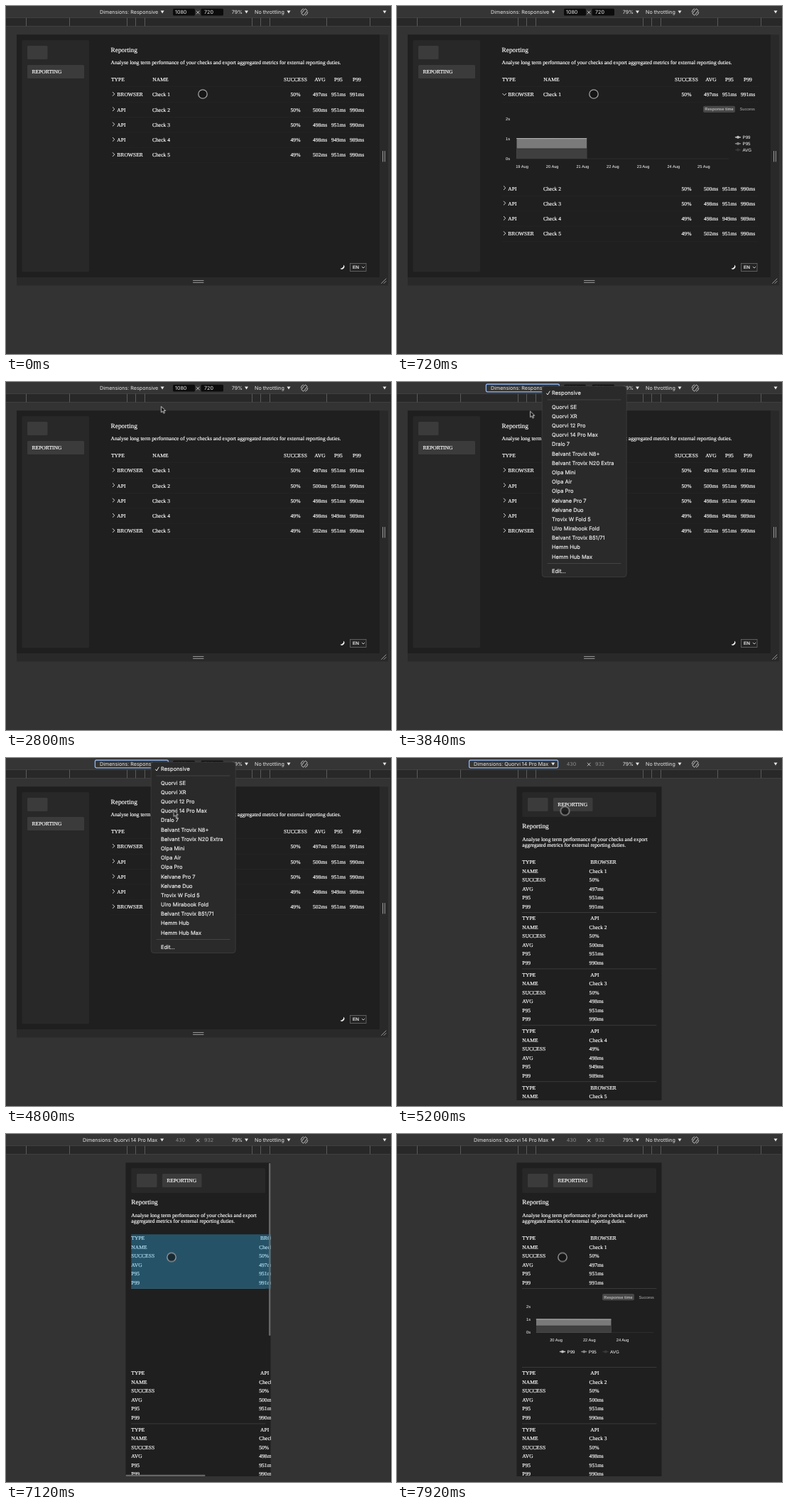
An HTML page that plays this animation: 542x490 px, repeating every 8 s.

```html
<!DOCTYPE html>
<html lang="en">
<head>
<meta charset="utf-8">
<title>Responsive reporting table</title>
<style>
html, body { margin: 0; width: 542px; height: 490px; overflow: hidden; background: #333; }
svg { display: block; }
text { white-space: pre; text-rendering: geometricPrecision; stroke-width: .16px; }
.page { font: 7.57px "Liberation Serif", serif; fill: #fff; }
.page text { stroke: #fff; }
.page .chart text { stroke: none; }
.chart { font: 5.68px "Liberation Sans", sans-serif; fill: #fff; }
.bar { font: 7.15px Inter, sans-serif; fill: #e8e8e8; }
.menu { font: 7.5px Inter, sans-serif; fill: #f2f2f2; }
.menu text { stroke: #f2f2f2; }
.mid { text-anchor: middle; }
.end { text-anchor: end; }
.line { fill: none; stroke-linecap: round; stroke-linejoin: round; }

/* 1% of the loop is 80 ms */
.move, .flip { animation: 8s linear -16ms infinite; }
.flip { animation-timing-function: step-end; }

.desktop { animation-name: desktop; }
.mobile { animation-name: mobile; }
.open { animation-name: open; }
.shut { animation-name: shut; }
.rest { animation-name: rest; }
.tapD { animation-name: tapD; }
.tapM { animation-name: tapM; }
.focusD { animation-name: focusD; }
.focusM { animation-name: focusM; }
.drop { animation-name: drop; }
.hover { animation-name: hover; }
.openM { animation-name: openM; }
.restM { animation-name: restM; }
.vals { animation-name: vals; }
.bars { animation-name: bars; }
.drawD { animation-name: drawD; }
.drawM { animation-name: drawM; }
.ptr { animation-name: ptr; }
.touch { animation-name: touch; }
.arrow { animation-name: arrow; }

@keyframes desktop { 0% { opacity: 1 } 63%, 100% { opacity: 0 } }
@keyframes mobile { 0% { opacity: 0 } 63%, 100% { opacity: 1 } }
@keyframes open { 0% { opacity: 0 } 6% { opacity: 1 } 28%, 100% { opacity: 0 } }
@keyframes shut { 0% { opacity: 1 } 6% { opacity: 0 } 28%, 100% { opacity: 1 } }
@keyframes rest { 0% { transform: none } 6% { transform: translateY(111px) } 28%, 100% { transform: none } }
@keyframes tapD { 0% { opacity: 0 } 5% { opacity: 1 } 7% { opacity: 0 } 27% { opacity: 1 } 29%, 100% { opacity: 0 } }
@keyframes tapM { 0% { opacity: 0 } 88% { opacity: 1 } 90%, 100% { opacity: 0 } }
@keyframes focusD { 0% { opacity: 0 } 43% { opacity: 1 } 63%, 100% { opacity: 0 } }
@keyframes focusM { 0% { opacity: 0 } 63% { opacity: 1 } 88%, 100% { opacity: 0 } }
@keyframes drop { 0%, 42.99% { opacity: 0 } 43%, 60.4% { opacity: 1 } 62%, 100% { opacity: 0 } }
@keyframes hover {
  0% { opacity: 0; transform: translateY(-13.2px) }
  50% { opacity: 1; transform: translateY(-13.2px) }
  51.6% { opacity: 1; transform: none }
  54% { opacity: 0 } 55% { opacity: 1 } 60%, 100% { opacity: 0 }
}
@keyframes openM { 0% { opacity: 0 } 91%, 100% { opacity: 1 } }
@keyframes restM { 0% { transform: none } 89%, 100% { transform: translateY(111px) } }
@keyframes vals { 0% { transform: none } 89% { transform: translateX(85.7px) } 91%, 100% { transform: none } }
@keyframes bars { 0%, 88.99% { opacity: 0 } 89%, 93% { opacity: 1 } 97%, 100% { opacity: 0 } }
@keyframes drawD {
  0%, 5.6% { clip-path: inset(-2px 100% -2px 0) }
  16.4%, 100% { clip-path: inset(-2px 0 -2px 0) }
}
@keyframes drawM {
  0%, 91.3% { clip-path: inset(-2px 100% -2px 0) }
  100% { clip-path: inset(-2px 28.5% -2px 0) }
}
@keyframes ptr {
  0%, 30% { transform: translate(277px, 124px) }
  35% { transform: translate(223.5px, 36.5px) }
  39%, 43% { transform: translate(135px, 6px) }
  53%, 75% { transform: translate(236.5px, 74.5px) }
  78% { transform: translate(238.5px, 118px) }
  82%, 100% { transform: translate(233px, 173.5px) }
}
@keyframes touch { 0% { opacity: 1 } 34.6% { opacity: 0 } 62%, 100% { opacity: 1 } }
@keyframes arrow { 0% { opacity: 0 } 34.6% { opacity: 1 } 62%, 100% { opacity: 0 } }
</style>
</head>
<body>
<svg id="stage" width="542" height="490" viewBox="0 0 542 490"></svg>
<script>
const rows = [
  ['BROWSER', '50%', '497ms', '951ms', '991ms'],
  ['API', '50%', '500ms', '951ms', '990ms'],
  ['API', '50%', '498ms', '951ms', '990ms'],
  ['API', '49%', '498ms', '949ms', '989ms'],
  ['BROWSER', '49%', '502ms', '951ms', '990ms']
];
const heads = ['TYPE', 'NAME', 'SUCCESS', 'AVG', 'P95', 'P99'];
const phone = 'Quorvi 14 Pro Max';
const devices = [
  'Quorvi SE', 'Quorvi XR', 'Quorvi 12 Pro', phone, 'Dralo 7',
  'Belvant Trovix N8+', 'Belvant Trovix N20 Extra', 'Olpa Mini', 'Olpa Air', 'Olpa Pro',
  'Kelvane Pro 7', 'Kelvane Duo', 'Trovix W Fold 5', 'Ulro Mirabook Fold',
  'Belvant Trovix B51/71', 'Hemm Hub', 'Hemm Hub Max'
];

const text = (x, y, s, attrs = '') => `<text x="${x}" y="${y}" ${attrs}>${s}</text>`;
const mid = (x, y, s, attrs = '') => text(x, y, s, `class="mid" ${attrs}`);
const rect = (x, y, w, h, fill, attrs = '') =>
  `<rect x="${x}" y="${y}" width="${w}" height="${h}" fill="${fill}" ${attrs}/>`;
const line = (d, color, w = 1, attrs = '') =>
  `<path class="line" d="${d}" stroke="${color}" stroke-width="${w}" ${attrs}/>`;
const group = (cls, ...parts) => `<g class="${cls}">${parts.join('')}</g>`;
const caret = x => `<path d="M${x} 6.6h5l-2.5 4z"/>`;
const ring = (x, w) => rect(x, 3, w, 10.8, 'none', 'rx="2" stroke="#8fb6f2" stroke-width="1.3"');

function toolbar() {
  const ticks = [28, 89, 170, 182, 195, 346, 358, 371, 451, 512];
  return rect(0, 0, 542, 16.5, '#353535') + rect(0, 16.5, 542, 12, '#282828') +
    line('M0 16.5H542M0 28.5H542', '#484848', .7) +
    line(ticks.map(x => `M${x + .5} 17V28`).join(''), '#5a5a5a') +
    rect(541, 17, 1, 473, '#252525') +
    group('bar',
      group('flip desktop',
        text(132, 11.2, 'Dimensions: Responsive') + caret(217.6),
        rect(235, 3.8, 31, 9.6, '#0c0c0c', 'rx="1.5"') + rect(274.5, 3.8, 31.5, 9.6, '#0c0c0c', 'rx="1.5"'),
        text(238, 11.2, '1080') + text(279, 11.2, '720')),
      group('flip mobile',
        text(108, 11.2, 'Dimensions: ' + phone) + caret(217.2),
        text(238.7, 11.2, '430', 'fill="#8b8b8b"') + text(279, 11.2, '932', 'fill="#8b8b8b"')),
      group('flip focusD', ring(125.4, 103)),
      group('flip focusM', ring(101.6, 125)),
      line('M268.2 7l4 4m0-4l-4 4', '#ddd', .8),
      text(317.7, 11.2, '79%') + caret(336),
      text(350, 11.2, 'No throttling') + caret(395.5) + caret(530.5),
      '<g transform="translate(420 8.5) rotate(38)">' +
        rect(-2, -4.4, 4, 8.8, 'none', 'rx=".8" stroke="#ddd" stroke-width=".8"') + '</g>',
      line('M415.2 8.5A4.8 4.8 0 0 1 418.6 3.9M424.8 8.5A4.8 4.8 0 0 1 421.4 13.1', '#ddd', .8));
}

// Response time chart; zero is the y of 0s, unit the height of one second
function chart(c) {
  const y = v => c.zero - v * c.unit;
  const w = c.x1 - c.x0, kink = c.x0 + w * .9;
  const top = `${c.x0} ${y(1.01)}L${kink} ${y(1)}L${c.x1} ${y(.96)}`;
  const avg = `${c.x0} ${y(.5)}H${c.x1}`;
  return rect(c.pill, c.pillY, 45, 9.2, '#474747', 'rx="2"') +
    mid(c.pill + 22.5, c.pillY + 6.6, 'Response time', 'font-weight="bold" fill="#b4b4b4"') +
    text(c.pill + 51.5, c.pillY + 6.6, 'Success', 'fill="#b0b0b0"') +
    [0, 1, 2].map(s => text(c.yLabel, y(s) + 2, s + 's', 'class="end"')).join('') +
    line(`M${c.x0} ${c.zero}H${c.x1 + 3}`, '#3a3a3a', .6) +
    group('move ' + c.draw,
      `<path d="M${top}V${c.zero}H${c.x0}z" fill="#7a7a7a"/>`,
      `<path d="M${avg}V${c.zero}H${c.x0}z" fill="#3f3f3f"/>`,
      line('M' + avg, '#2c2c2c', .8), line('M' + top, '#c4c4c4', .9)) +
    c.days.map((d, i) => mid(c.dayX + i * c.dayStep, c.dayY, d + ' Aug')).join('') +
    ['P99', 'P95', 'AVG'].map((s, i) => {
      const [x, ly] = c.legend(i), color = ['#c0c0c0', '#858585', '#3a3a3a'][i];
      return line(`M${x} ${ly}h7`, color, 1.4) +
        `<circle cx="${x + 3.5}" cy="${ly}" r="2" fill="${color}"/>` +
        text(x + 10, ly + 2.1, s, 'font-size="6.2"');
    }).join('');
}

const cols = [407.5, 442, 468, 494];

function desktopRow(r, i) {
  const y = 127.2 + i * 21.3;
  const closed = line(`M150.3 ${y - 5.8}l2.5 2.5l-2.5 2.5`, '#eee', .9);
  const opened = line(`M148.8 ${y - 3.8}l2.4 2.4l2.4-2.4`, '#eee', .9);
  return (i ? closed : group('flip shut', closed) + group('flip open', opened)) +
    text(156.3, y, r[0]) + text(206, y, 'Check ' + (i + 1)) +
    r.slice(1).map((v, k) => mid(cols[k], y, v)).join('') +
    line(`M147.5 ${y + 8}H508`, '#272727', .7);
}

function desktop() {
  const c = chart({
    x0: 168.5, x1: 464, zero: 215, unit: 28.2, yLabel: 159, pill: 431, pillY: 140.8,
    days: [19, 20, 21, 22, 23, 24, 25], dayX: 176, dayStep: 42.65, dayY: 227.6,
    legend: i => [476.5, 184.8 + i * 8.9], draw: 'drawD'
  });
  return rect(15, 40.4, 523, 353, '#292929') + rect(15, 40.4, 511, 341.6, '#1f1f1f') +
    line('M530.5 204.5V219M533.3 204.5V219M263.5 386.6H278M263.5 389.4H278', '#9a9a9a', 1) +
    line('M528.5 390.5l6.5-6.5M532 390.5l3-3', '#9a9a9a', 1) +
    rect(22.5, 48.3, 94.5, 326, '#282828', 'rx="1.5"') +
    rect(30, 56, 28.5, 19, '#3b3b3b', 'rx="1.5"') +
    rect(30, 83, 80, 19, '#3b3b3b', 'rx="1.5"') +
    text(36.5, 95.2, 'REPORTING') +
    text(147.5, 65, 'Reporting', 'font-size="9.4"') +
    text(147.5, 82, 'Analyse long term performance of your checks and export aggregated metrics for external reporting duties.') +
    text(148, 106.4, heads[0]) + text(206.3, 106.4, heads[1]) +
    heads.slice(2).map((h, k) => mid(cols[k], 106.4, h)).join('') +
    line('M147.5 113.6H508', '#272727', .7) +
    desktopRow(rows[0], 0) +
    group('flip open', group('chart', c)) +
    group('flip rest', rows.slice(1).map((r, i) => desktopRow(r, i + 1)).join('')) +
    group('flip tapD', rect(147, 113, 361, 22, 'rgba(51,181,229,.38)')) +
    '<path d="M475.2 364.4a3.6 3.6 0 1 1-5 5.2a4.6 4.6 0 0 0 5-5.2z"/>' +
    rect(484.5, 362.5, 22.5, 11, '#242424', 'stroke="#6c6c6c" stroke-width=".8"') +
    text(488, 370.4, 'EN', 'font-family="Liberation Sans, sans-serif" font-size="6.5"') +
    line('M501.2 367.2l1.8 1.8l1.8-1.8', '#eee', .8);
}

function mobileRow(r, i) {
  const y = 149 + i * 79.4;
  const vals = [r[0], 'Check ' + (i + 1), ...r.slice(1)];
  return heads.map((h, k) => text(176.3, y + k * 12.5, h)).join('') +
    group('flip vals', vals.map((v, k) => text(k ? 270.6 : 272.3, y + k * 12.5, v)).join('')) +
    line(`M176.3 ${y + 68.5}H365`, '#414141', .8);
}

function mobile() {
  const c = chart({
    x0: 196, x1: 358, zero: 279.4, unit: 18.4, yLabel: 188, pill: 289, pillY: 225,
    days: [20, 22, 24], dayX: 224, dayStep: 46.8, dayY: 292,
    legend: i => [229.5 + i * 30.3, 306.5], draw: 'drawM'
  });
  return rect(168.5, 40.4, 204, 441.6, '#1f1f1f') +
    rect(176.3, 48.3, 188.7, 34.7, '#282828', 'rx="1.5"') +
    rect(184, 56, 28.5, 19, '#3b3b3b', 'rx="1.5"') +
    rect(220, 56, 55.5, 19, '#3b3b3b', 'rx="1.5"') +
    text(226.3, 68.2, 'REPORTING') +
    text(176.3, 99.2, 'Reporting', 'font-size="9.4"') +
    text(176.3, 116.6, 'Analyse long term performance of your checks and export') +
    text(176.3, 125.1, 'aggregated metrics for external reporting duties.') +
    mobileRow(rows[0], 0) +
    group('flip openM', group('chart', c), line('M176.3 328.5H365', '#414141', .8)) +
    group('flip restM', rows.slice(1).map((r, i) => mobileRow(r, i + 1)).join('')) +
    group('flip tapM', rect(176.3, 141.3, 197, 76.5, 'rgba(51,165,220,.38)')) +
    group('move bars', rect(370, 41, 2.5, 243, '#666', 'rx="1"'), rect(168.5, 479.8, 112, 2.2, '#666', 'rx="1"'));
}

function menu() {
  return rect(204.2, 5.7, 119, 268.8, '#2a2a2a', 'rx="4" stroke="#484848" stroke-width=".6"') +
    group('flip hover', rect(207, 68.6, 114, 12.8, '#2f62c4', 'rx="2.5"')) +
    line('M210.5 16l1.6 2l3-5', '#ececec', 1) +
    text(218, 18, 'Responsive') +
    devices.map((d, i) => text(218, 37.7 + i * 13.18, d)).join('') +
    line('M212 25H315M212 255.5H315', '#4c4c4c', .8) +
    text(218, 268.6, 'Edit…');
}

const pointer = group('flip touch',
    '<circle r="6.2" fill="#111" fill-opacity=".6" stroke="#a2a2a2" stroke-width="1.3"/>') +
  group('flip arrow',
    '<path d="M-.3-.6V7.8L1.7 6.1L3.1 9.2L4.6 8.5L3.2 5.5H5.8z" fill="#111" stroke="#f2f2f2" stroke-width=".8"/>');

document.getElementById('stage').innerHTML =
  '<clipPath id="view"><rect x="168" y="40" width="205" height="442"/></clipPath>' +
  rect(0, 0, 542, 490, '#333') + toolbar() +
  group('flip desktop', group('page', desktop())) +
  `<g clip-path="url(#view)">${group('flip mobile', group('page', mobile()))}</g>` +
  group('move drop', group('menu', menu())) +
  group('move ptr', pointer);
</script>
</body>
</html>
```
